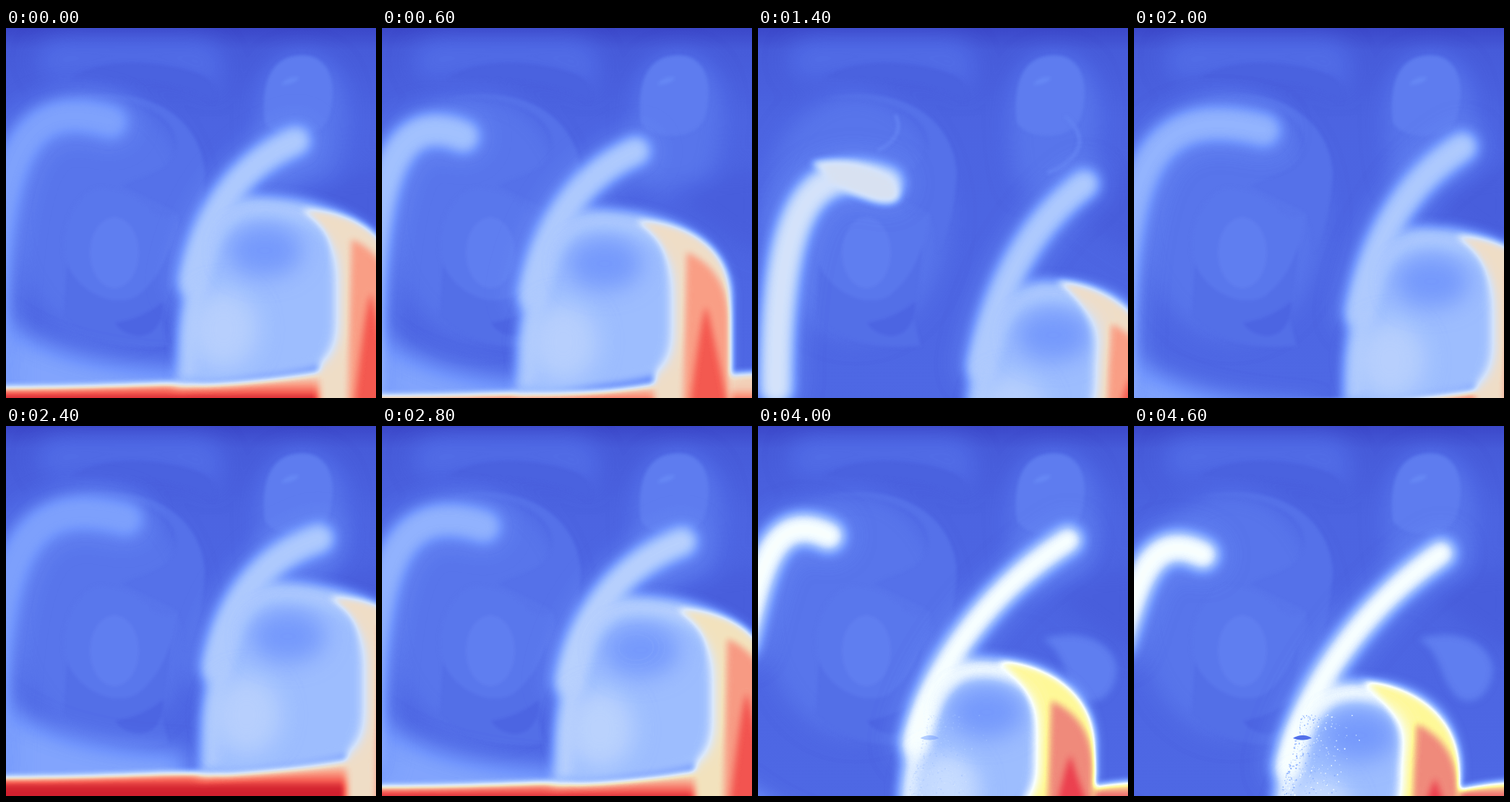
Write an HTML page that moves like this. It is 512x512 px and loops after 4.8 s.

```html
<!DOCTYPE html>
<html lang="en">
<head>
<meta charset="utf-8">
<title>Convection</title>
<style>
html, body { margin: 0; width: 100%; height: 100%; overflow: hidden; background: #4a66e0; }
svg { display: block; width: 100vw; height: 100vh; }
</style>
</head>
<body>
<!-- Shapes are grey temperatures; the "heat" filter turns them into colours. -->
<svg viewBox="0 0 512 512" preserveAspectRatio="none">
  <defs id="defs">
    <filter id="heat" filterUnits="userSpaceOnUse" x="0" y="0" width="512" height="512" color-interpolation-filters="sRGB">
      <feComponentTransfer>
        <feFuncR id="mapR" type="table"/><feFuncG id="mapG" type="table"/><feFuncB id="mapB" type="table"/>
      </feComponentTransfer>
    </filter>
    <linearGradient id="sky" x2="0" y2="1">
      <stop stop-color="#050505"/><stop offset=".06" stop-color="#151515"/>
      <stop offset=".25" stop-color="#1d1d1d"/><stop offset="1" stop-color="#202020"/>
    </linearGradient>
    <linearGradient id="ember" gradientUnits="userSpaceOnUse" x1="0" x2="0" y1="470" y2="500">
      <stop stop-color="#a6a6a6"/><stop offset="1" stop-color="#f8f8f8"/>
    </linearGradient>
  </defs>
  <g filter="url(#heat)">
    <rect width="512" height="512" fill="url(#sky)"/>
    <g filter="url(#b16)">
      <ellipse cx="135" cy="260" rx="130" ry="170" fill="#2a2a2a"/>
      <path d="M350 170C340 70 365 35 410 35S480 75 470 150 440 230 400 230 355 220 350 170Z" fill="#2a2a2a"/>
      <path d="M40 45Q45 16 90 16H260Q305 18 300 60L290 90Q220 40 60 75Z" fill="#242424"/>
      <path d="M455 210Q500 190 530 200V320Q460 280 400 225Z" fill="#181818"/>
    </g>
    <g filter="url(#b2)">
      <path d="M92 70C130 40 220 45 270 65 290 75 292 90 286 104 250 75 180 70 92 70Z" fill="#1b1b1b"/>
      <path d="M90 98C190 75 270 120 275 200 272 250 262 290 248 310 250 280 235 260 238 256L160 219C185 203 235 200 236 160 232 110 160 92 90 98Z" fill="#272727"/>
      <path d="M82 324C100 368 150 390 185 371 220 340 236 300 238 256 225 264 210 262 198 249 180 230 160 222 130 220 95 225 70 280 82 324Z" fill="#2b2b2b"/>
      <path d="M84 326C100 365 145 388 180 372 210 350 222 320 228 300L220 376Q190 402 152 408C170 430 205 430 214 395L225 440Q130 450 80 400Z" fill="#252525"/>
      <ellipse cx="150" cy="311" rx="34" ry="49" fill="#303030"/>
      <path d="M152 408C180 404 205 390 218 378 218 400 210 425 185 426 165 425 155 415 152 408Z" fill="#1e1e1e"/>
      <path d="M358 130C352 70 370 38 410 38S458 80 448 120 368 155 358 130Z" fill="#2f2f2f"/>
      <path d="M381 79C385 69 399 66 406 69 401 76 391 78 381 79Z" fill="#373737"/>
    </g>
    <path id="vortex" d="M394 296C430 280 490 290 497 335 495 372 470 390 448 376 422 352 425 310 394 296Z" fill="#303030" filter="url(#b5)"/>
    <path id="haze" d="M-30 365C40 425 120 445 250 452V620H-30Z" fill="#4c4c4c" filter="url(#b16)"/>
    <path id="wisp" d="M425 122Q455 150 440 172T400 200M190 120Q205 150 165 170" fill="none" stroke="#333" stroke-width="5" filter="url(#b2)"/>

    <g fill="none" stroke-linecap="round">
      <path id="leftGlow" stroke="#404040" opacity=".6" filter="url(#b16)"/>
      <path id="left" filter="url(#b8)"/>
      <path id="rightGlow" stroke="#404040" opacity=".6" filter="url(#b16)"/>
    </g>
    <path id="lens" d="M74 186C115 175 180 195 194 222 201 240 185 246 160 240 120 228 100 212 74 186Z" fill="#858585" filter="url(#b5)"/>

    <path id="floor" fill="url(#ember)" filter="url(#b5)"/>
    <path id="shell" filter="url(#b8)"/>
    <path id="hot" fill="#9f9f9f" filter="url(#b5)"/>
    <path id="core" fill="#c0c0c0" filter="url(#b5)"/>
    <path id="heart" fill="#e0e0e0" filter="url(#b5)"/>
    <path id="dome" fill="#5e5e5e" filter="url(#b8)"/>
    <path id="right" fill="none" stroke-linecap="round" filter="url(#b8)"/>
    <ellipse id="lobe" rx="48" ry="55" fill="#6e6e6e" filter="url(#b16)"/>
    <ellipse id="eddy" rx="52" ry="36" fill="#444" filter="url(#b16)"/>
    <g id="rings" fill="none" stroke="#505050" stroke-width="2"></g>
    <g id="specks"></g>
  </g>
</svg>
<script>
const LOOP = 4800, STEP = 200;
const byId = id => document.getElementById(id);
const grey = v => { const g = Math.round(v * 255); return `rgb(${g},${g},${g})`; };
const set = (id, attrs) => { for (const k in attrs) byId(id).setAttribute(k, attrs[k]); };
const mix = (a, b, f) => a + (b - a) * f;
const clamp = v => Math.max(0, Math.min(1, v));

function add(parent, tag, attrs) {
  const node = document.createElementNS('http://www.w3.org/2000/svg', tag);
  for (const k in attrs) node.setAttribute(k, attrs[k]);
  return byId(parent).appendChild(node);
}

// Smooth curve through [time, value] points.
function curve(points) {
  const slope = i => {
    const [a, b] = [points[Math.max(0, i - 1)], points[Math.min(points.length - 1, i + 1)]];
    return (b[1] - a[1]) / (b[0] - a[0]);
  };
  return time => {
    let i = points.length - 2;
    while (i && points[i][0] > time) i--;
    const [t0, v0] = points[i], [t1, v1] = points[i + 1];
    const span = t1 - t0, f = (time - t0) / span, g = 1 - f;
    return v0 * g * g * (1 + 2 * f) + v1 * f * f * (3 - 2 * f)
      + span * f * g * (slope(i) * g - slope(i + 1) * f);
  };
}

// The whole flow follows three motions: the dome's sideways sway, its apex, and the left head's height.
const swayAt = curve([[0, 236], [650, 187], [1500, 294], [2400, 268], [3200, 208], [4600, 190]]);
const apexAt = curve([[0, 232], [600, 250], [1500, 350], [2400, 215], [3200, 275], [4600, 352]]);
const headAt = curve([[0, 130], [600, 150], [1400, 215], [1600, 212], [1800, 158], [2400, 129], [3200, 153], [4000, 152], [4600, 178]]);

const calm = [[56, 66, 196], [78, 104, 228], [112, 148, 252], [160, 192, 255], [212, 227, 251],
  [240, 221, 198], [250, 160, 135], [245, 92, 82], [200, 16, 36]];
const vivid = calm.slice(0, 4).concat([[248, 255, 255], [255, 248, 150], [240, 140, 125], [236, 66, 80], [222, 40, 62]]);

for (const size of [2, 5, 8, 16]) {
  const filter = add('defs', 'filter', { id: 'b' + size, filterUnits: 'userSpaceOnUse',
    x: -80, y: -80, width: 672, height: 672, 'color-interpolation-filters': 'sRGB' });
  add(filter.id, 'feGaussianBlur', { stdDeviation: size });
}
for (const r of [24, 32, 40]) add('rings', 'ellipse', { rx: r, ry: r * .75 });

let seed = 7;
const random = () => (seed = seed * 16807 % 2147483647) / 2147483647;
for (let i = 0; i < 400; i++) {
  const y = random(), x = random() * random();
  add('specks', 'circle', { cx: 203 + x * 90 + (1 - y) * 30, cy: 400 + y * 112, r: .4 + random() * .8,
    fill: grey(.32 + random() * .18) });
}
add('specks', 'path', { d: 'M220 432Q234 424 246 432 232 437 220 432Z', fill: grey(.15) });

function plume(name, d, width, heat) {
  set(name, { d, 'stroke-width': width, stroke: grey(heat) });
  set(name + 'Glow', { d, 'stroke-width': width + 24 });
}

function drawArms(foot, apex, head, glow, lens) {
  const wall = mix(-22, 25, lens), headX = 145 + .65 * (foot - 236) - 20 * glow;
  plume('left',
    `M${wall} ${500 - 200 * glow}C${wall + 25 * glow} ${head + 50} ${wall + 40} ${head - 40} ${headX} ${head}`,
    44, Math.min(.5, .28 + .0045 * (head - 128) + .15 * glow * glow));

  const tipX = foot + 165 + 70 * glow, tipY = 155 + .7 * (head - 128) - 14 * glow;
  plume('right',
    `M${foot + 22} ${apex + 120}C${foot + 34} ${apex + 45} ${mix(foot, tipX, .45)} ${mix(apex, tipY, .5)} ${tipX} ${tipY}`,
    40, .41 + .09 * glow);
}

function drawDome(foot, apex, drop, glow) {
  const top = foot + 110, inner = foot + 228 - .35 * drop, outer = inner + 80, shoulder = apex + 115;
  const left = 487 + .65 * drop, corner = 455 + .7 * drop, right = Math.min(494, corner);
  const tipX = top + 70 - .4 * drop, tipY = apex + 22 - .15 * drop, vault = apex + 32;

  set('ember', { gradientTransform: `translate(0 ${Math.min(28, .8 * drop)})` });
  set('floor', { d: `M-30 ${left}C120 ${left} 200 ${left - 6} 280 ${left - 8}S${inner} ${right} 550 ${right - 4}V580H-30Z` });
  set('shell', {
    d: `M${foot} ${left - 4}C${foot} ${apex + 110} ${top - 70} ${apex} ${top} ${apex}`
      + `C${top + 80} ${apex} ${outer - 5} ${shoulder - 85} ${outer} ${shoulder}V${right}H${inner - 30}Z`,
    fill: grey(.41 + .09 * glow)
  });
  set('hot', {
    d: `M${tipX} ${tipY}C${tipX + 50} ${tipY} ${outer - 6} ${shoulder - 75} ${outer} ${shoulder}V560H${inner - 25}`
      + `V${shoulder}C${inner} ${shoulder - 50} ${mix(tipX, inner, .7)} ${tipY + 25} ${tipX} ${tipY}Z`
  });
  set('core', {
    d: `M${inner + 14} 560L${inner + 20} ${shoulder - 55}C${inner + 50} ${shoulder - 42} ${outer - 2} ${shoulder - 15} ${outer - 2} ${shoulder + 40}V560Z`
  });
  set('heart', {
    d: `M${inner + 20} 560Q${inner + 38} ${shoulder + 40} ${inner + 47} ${shoulder + 20}Q${inner + 58} ${shoulder + 60} ${outer + 4} 560Z`
  });
  set('dome', {
    d: `M${foot + 28} ${left - 10}C${foot + 24} ${vault + 100} ${top - 55} ${vault} ${top} ${vault}`
      + `C${mix(top, inner, .6)} ${vault} ${inner} ${shoulder - 70} ${inner} ${shoulder}`
      + `V${corner - 60}Q${inner} ${corner} ${inner - 50} ${corner + 7}Q${inner - 100} ${left - 12} ${foot + 28} ${left - 10}Z`
  });
  set('lobe', { cx: foot + 65, cy: apex + 185 });
  set('eddy', { cx: foot + 122, cy: apex + 76 });
  set('rings', { transform: `translate(${foot + 115} ${apex + 72})`, opacity: 2 * glow * (1 - glow) });
}

function draw(time) {
  const foot = swayAt(time), apex = apexAt(time), head = headAt(time);
  const drop = apex - 215;
  const glow = clamp((time - 2500) / 1500);
  const lens = clamp((head - 165) / 45) * (1 - glow);

  drawArms(foot, apex, head, glow, lens);
  drawDome(foot, apex, drop, glow);
  set('haze', { transform: `translate(0 ${1.2 * drop})` });
  set('lens', { opacity: lens });
  set('wisp', { opacity: lens });
  set('vortex', { opacity: glow });
  set('specks', { opacity: clamp((time - 3800) / 800), transform: `translate(${foot - 190})` });
  ['mapR', 'mapG', 'mapB'].forEach((id, k) => set(id, {
    tableValues: calm.map((color, n) => (mix(color[k], vivid[n][k], glow) / 255).toFixed(4)).join(' ')
  }));
}

const start = performance.now();
let shown = -1;
function tick() {
  const step = Math.floor((performance.now() - start) % LOOP / STEP);
  if (step !== shown) draw((shown = step) * STEP);
  requestAnimationFrame(tick);
}
tick();
</script>
</body>
</html>
```
